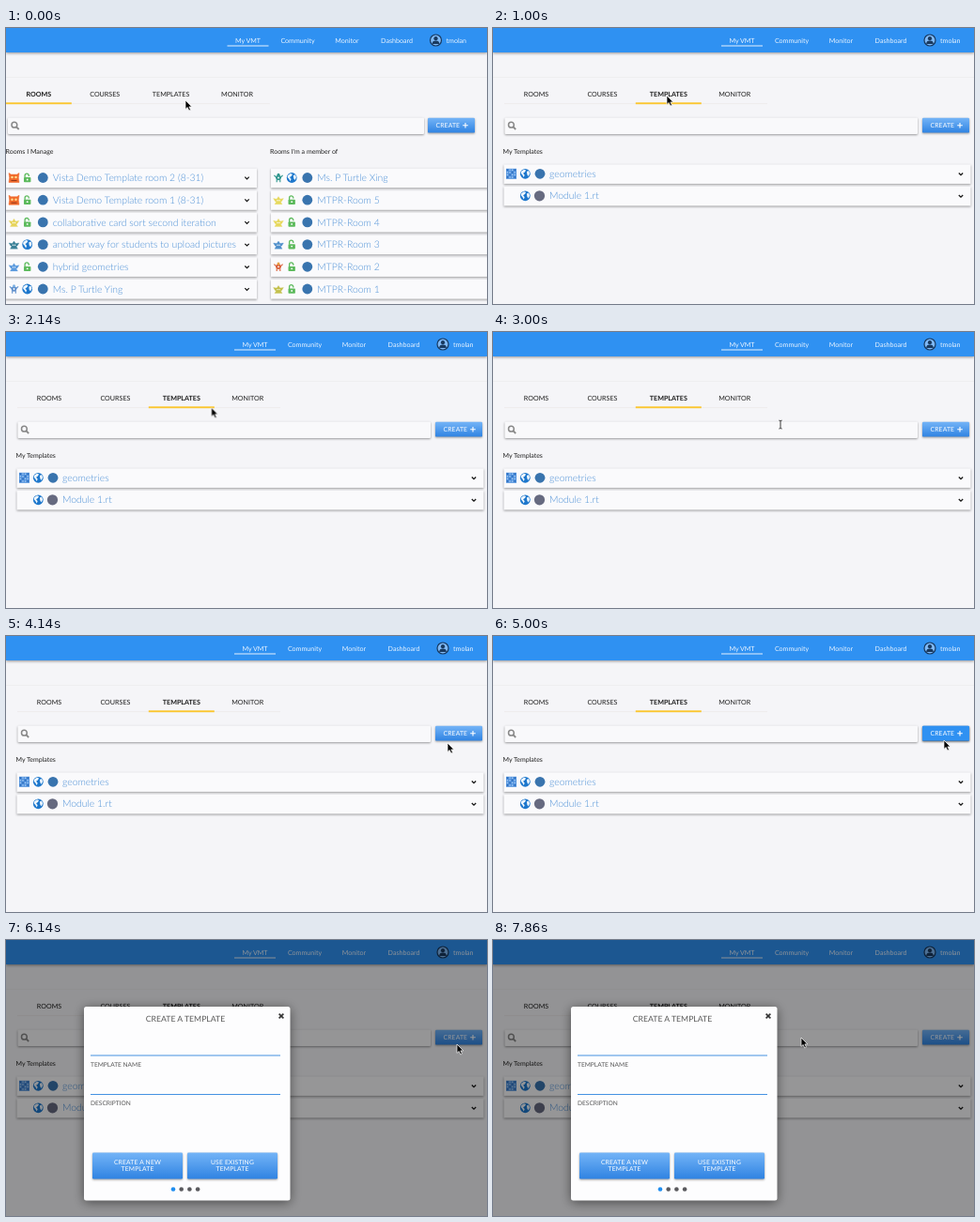
Recreate the animation shown at these times as an HTML page. Size 512 by 294 pixels, loop 8000 ms.

```html
<!DOCTYPE html>
<html lang="en">
<head>
<meta charset="utf-8">
<title>Templates</title>
<style>
html, body { margin: 0; width: 100%; height: 100%; overflow: hidden; background: #f5f5f8; }
svg { display: block; width: 100vw; height: 100vh; font-family: Lato, "Open Sans", sans-serif; text-rendering: geometricPrecision; }
.card { filter: drop-shadow(0 1px 1px rgba(0, 0, 0, .38)); }
.bar { filter: drop-shadow(0 1px 1.5px rgba(0, 0, 0, .4)); }
.sheet { filter: drop-shadow(0 2px 6px rgba(0, 0, 0, .5)); }
</style>
</head>
<body>
<svg id="stage" viewBox="0 0 512 294" preserveAspectRatio="none"></svg>
<script>
const LOOP = 8000;
const BLUE = '#2f91f2', DISC = '#3974ae', NAVY = '#18395f';

const rect = (x, y, w, h, fill, extra = '') =>
  `<rect x="${x}" y="${y}" width="${w}" height="${h}" fill="${fill}" ${extra}/>`;
const circle = (x, y, r, fill, extra = '') =>
  `<circle cx="${x}" cy="${y}" r="${r}" fill="${fill}" ${extra}/>`;
const path = (d, stroke, width = 1, fill = 'none') =>
  `<path d="${d}" fill="${fill}" stroke="${stroke}" stroke-width="${width}"/>`;
const at = (x, y, body) => `<g transform="translate(${x} ${y})">${body}</g>`;
const text = (x, y, size, fill, str, weight = 400, anchor = 'start', gap = 0) =>
  `<text x="${x}" y="${y}" font-size="${size}" fill="${fill}" font-weight="${weight}" ` +
  `text-anchor="${anchor}" letter-spacing="${gap}">${str}</text>`;
const mid = (x, y, size, fill, str, weight, gap) => text(x, y, size, fill, str, weight, 'middle', gap);

// Small icons, each centred on 0,0
const lock = path('M-2.6 0V-2.3a2.1 2.1 0 0 1 4.2 0V-1.6', '#5cba5c', 1.3) +
  rect(-3.7, -.4, 7.4, 5.2, '#5cba5c', 'rx=".8"') + circle(0, 2, .9, '#fff');
const globe = circle(0, 0, 5.4, '#1d77cc') +
  path('M-4.2-2.6L-1.4-4.6L.8-3.8L-.4-1.8L-2.2-.6L-.6 1.4L-1.6 3.8L-3 1.2L-4.6-.6Z' +
       'M1.6-2.4L3.8-3.2L4.8-.4L3.4 2.6L2 .8Z', 'none', 0, '#eef6fd');
const disc = circle(0, 0, 5.4, DISC);
const tile = () => {
  let s = rect(-5.5, -5.5, 11, 11, '#4d8fdc');
  for (let i = 0; i < 16; i++) {
    const x = i % 4, y = i >> 2;
    s += rect(-4.8 + x * 2.6, -4.8 + y * 2.6, 1.4, 1.4, (x + y) % 3 ? '#a9cdf4' : '#2b68b4');
  }
  return s;
};
const boxy = c => path('M-5.5-5L-3-3.5H3L5.5-5L4.8 0L5.5 5H-5.5L-4.8 0Z', c, .5, c) +
  path('M-3 3H3', '#8a3018', .9) +
  circle(-2, -.5, 1.3, '#ffd98a') + circle(2, -.5, 1.3, '#ffd98a');
const winged = c => path('M0-3.6L1.8-1L5.4-1.6L3.6 1.4L2.4 2L4 4.6H-4L-2.4 2L-3.6 1.4L-5.4-1.6L-1.8-1Z', c, .3, c) +
  circle(-1, .6, .7, '#fff') + circle(1, .6, .7, '#fff');
const stalky = (c, eye) => path('M-4.6-2.6L-1.8 0M4.6-2.6L1.8 0M-1.8 4.8V2M1.8 4.8V2', c, 1.1) +
  `<ellipse rx="2.8" ry="2.7" fill="${c}"/>` + circle(0, -3.2, 1.5, eye) + circle(0, 0, .9, '#fff');
const chevron = path('M-2.2-1.1L0 1.1L2.2-1.1', '#111', 1.2);

const button = (x, y, w, h, fill) => rect(x, y, w, h, fill, 'rx="1.2" class="card"');

function nav(dx) {
  const tabs = [[265, 'My VMT'], [318, 'Community'], [370.5, 'Monitor'], [423.5, 'Dashboard']];
  return rect(0, 0, 512, 26, BLUE, 'class="bar"') +
    at(dx, 0, tabs.map(([x, s]) => mid(x, 16, 7.1, '#eaf4ff', s)).join('') +
      rect(243, 18.5, 44, 1, '#e6f2ff') +
      circle(465, 13, 6, '#7fb9f6', `stroke="${NAVY}" stroke-width="1.2"`) +
      circle(465, 11.2, 2.1, NAVY) + path('M461.2 16.9a3.8 3.4 0 0 1 7.6 0Z', 'none', 0, NAVY) +
      text(476, 16, 7.1, '#eaf4ff', 'tmolan'));
}

function tabs(dx, active) {
  const names = ['ROOMS', 'COURSES', 'TEMPLATES', 'MONITOR'];
  return at(dx, 0, rect(12, 80.5, 280, .6, '#e9e4e4') +
    names.map((s, i) => {
      const x = 46 + i * 70.4;
      return mid(x, 73, 7.15, '#1c1c1c', s, i === active ? 700 : 400) +
        (i === active ? rect(x - 35, 79.3, 70, 1.9, '#fbc62f') : '');
    }).join(''));
}

function search(x, w) {
  return rect(x, 95.5, w, 17.5, '#f9f9fb', 'rx="1" class="card"') +
    at(x + 7.5, 104, circle(-.6, -.8, 2.9, 'none', 'stroke="#888" stroke-width="1.5"') +
      path('M1.6 1.4L4.2 4', '#888', 1.8));
}

function create(x, fill) {
  return button(x, 95.8, 50, 15.8, fill) +
    text(x + 8.5, 106, 6.8, '#fff', 'CREATE', 400, 'start', .15) +
    path(`M${x + 37.2} 103.7h5.6M${x + 40} 100.9v5.6`, '#fff', 1.1);
}

function row(x, y, w, icons, label, tx) {
  return rect(x, y - 10, w, 20.6, '#fafafc', 'class="card"') +
    icons.map(([ix, icon]) => at(ix, y, icon)).join('') +
    text(tx, y + 3.6, 10.4, '#4b8fd6', label, 300) +
    at(x + w - 10.5, y + .3, chevron);
}

function roomsPage() {
  const left = [
    [boxy('#f0692a'), lock, 'Vista Demo Template room 2 (8-31)'],
    [boxy('#f0692a'), lock, 'Vista Demo Template room 1 (8-31)'],
    [winged('#e6d45c'), lock, 'collaborative card sort second iteration'],
    [winged('#3c8298'), globe, 'another way for students to upload pictures'],
    [winged('#5b9ade'), lock, 'hybrid geometries'],
    [stalky('#5f8fcc', '#7db1e4'), globe, 'Ms. P Turtle Ying']
  ];
  const right = [
    [stalky('#2f968e', '#2f968e'), globe, 'Ms. P Turtle Xing'],
    [winged('#e6d85c'), lock, 'MTPR-Room 5'],
    [winged('#e6d85c'), lock, 'MTPR-Room 4'],
    [winged('#4f8fcb'), lock, 'MTPR-Room 3'],
    [stalky('#d9603a', '#e8a040'), lock, 'MTPR-Room 2'],
    [winged('#c3c04c'), lock, 'MTPR-Room 1']
  ];
  const list = (rows, x, w, ix) => rows.map(([face, state, name], i) =>
    row(x, 159.5 + i * 23.7, w, [[ix, face], [ix + 14.2, state], [ix + 30.8, disc]], name, ix + 41.3)).join('');
  return rect(0, 0, 512, 294, '#f5f5f8') + rect(0, 52, 512, .6, '#e9e9ec') +
    nav(-7.5) + tabs(-11.2, 0) + search(2, 443) + create(449, 'url(#shine)') +
    text(-.5, 134, 7, '#222', 'Rooms I Manage') + text(281, 134, 7, '#222', "Rooms I'm a member of") +
    list(left, -1, 268, 8.5) + list(right, 282, 268, 290);
}

function templatesPage() {
  return rect(0, 0, 512, 294, '#f5f5f8') + rect(0, 52, 512, .6, '#e9e9ec') +
    nav(0) + tabs(0, 2) + search(12.5, 439.5) + create(457, 'url(#shine)') +
    `<g id="hover">${create(457, BLUE)}</g>` +
    text(10.5, 134, 7, '#222', 'My Templates') +
    row(11.5, 155.3, 497, [[19.5, tile()], [34.3, globe], [50, disc]], 'geometries', 60) +
    row(11.5, 178.8, 497, [[34.3, globe], [49.5, circle(0, 0, 5.6, '#666a80')]], 'Module 1.rt', 60);
}

function dialog() {
  const choice = (x, a, b) => button(x, 226.5, 96, 28, 'url(#shine)') +
    mid(x + 48, 239, 6.7, '#fff', a, 400, .2) + mid(x + 48, 246.2, 6.7, '#fff', b, 400, .2);
  const field = (y, name) => rect(90, y, 202, 1, '#4592e2') + text(90, y + 12, 6.6, '#555', name);
  return rect(0, 0, 512, 294, '#000', 'opacity=".4"') +
    rect(83, 71, 219.5, 206.5, '#fdfdfe', 'rx="2.5" class="sheet"') +
    mid(191, 87, 8.7, '#5a5a5a', 'CREATE A TEMPLATE') +
    path('M290.6 78.6L295.4 83.4M295.4 78.6L290.6 83.4', '#333', 1.6) +
    field(122.5, 'TEMPLATE NAME') + field(164, 'DESCRIPTION') +
    choice(92, 'CREATE A NEW', 'TEMPLATE') + choice(193, 'USE EXISTING', 'TEMPLATE') +
    [0, 1, 2, 3].map(i => circle(178 + i * 8.7, 265.5, 2.3, i ? '#5a5a5e' : '#1f8ef0')).join('');
}

const stage = document.getElementById('stage');
stage.innerHTML =
  `<defs><linearGradient id="shine" x2="0" y2="1"><stop stop-color="#74b4f7"/>` +
  `<stop offset="1" stop-color="#2f83e2"/></linearGradient></defs>` +
  `<g>${templatesPage()}</g><g id="rooms">${roomsPage()}</g><g id="dialog">${dialog()}</g>` +
  `<g id="mouse"><g id="arrow">${path('M0 0V9.4L2.2 7.5L3.8 11L5.5 10.2L3.9 6.9H6.8Z', '#fff', .7, '#000')}</g>` +
  `<g id="beam">${path('M-1.6-3.8Q0-3.8 0-3V4.2Q0 5 1.6 5M1.6-3.8Q0-3.8 0-3M0 4.2Q0 5-1.6 5', '#222', .9)}</g></g>`;

// rows: [time, value, ticks to the next row]; one tick is a single jump
function play(id, prop, rows) {
  const frames = rows.map(([t, v, n = 1]) =>
    ({ [prop]: v, offset: Math.max(0, t - 2) / LOOP, easing: `steps(${n}, end)` }));
  frames.push({ [prop]: rows[rows.length - 1][1], offset: 1 });
  const anim = document.getElementById(id).animate(frames, { duration: LOOP, iterations: Infinity });
  anim.startTime = document.timeline.currentTime;
}

const moves = [
  [0, 191, 77], [140, 188, 74], [290, 185, 72], [1290, 185, 72, 7],
  [2290, 232, 84, 5], [3000, 306, 98, 4], [3570, 390, 106, 3], [4000, 457, 113],
  [4140, 470, 114, 3], [4570, 480, 111], [7140, 480, 111], [7290, 473, 112, 3],
  [7720, 360, 107], [7860, 328, 104]
];
play('mouse', 'transform', moves.map(([t, x, y, n]) => [t, `translate(${x}px, ${y}px)`, n]));
play('arrow', 'opacity', [[0, 1], [2860, 0], [4000, 1]]);
play('beam', 'opacity', [[0, 0], [2860, 1], [4000, 0]]);
play('rooms', 'opacity', [[0, 1], [570, 0]]);
play('hover', 'opacity', [[0, 0], [4570, 1], [6140, 0]]);
play('dialog', 'opacity', [[0, 0], [6140, 1]]);
</script>
</body>
</html>
```
